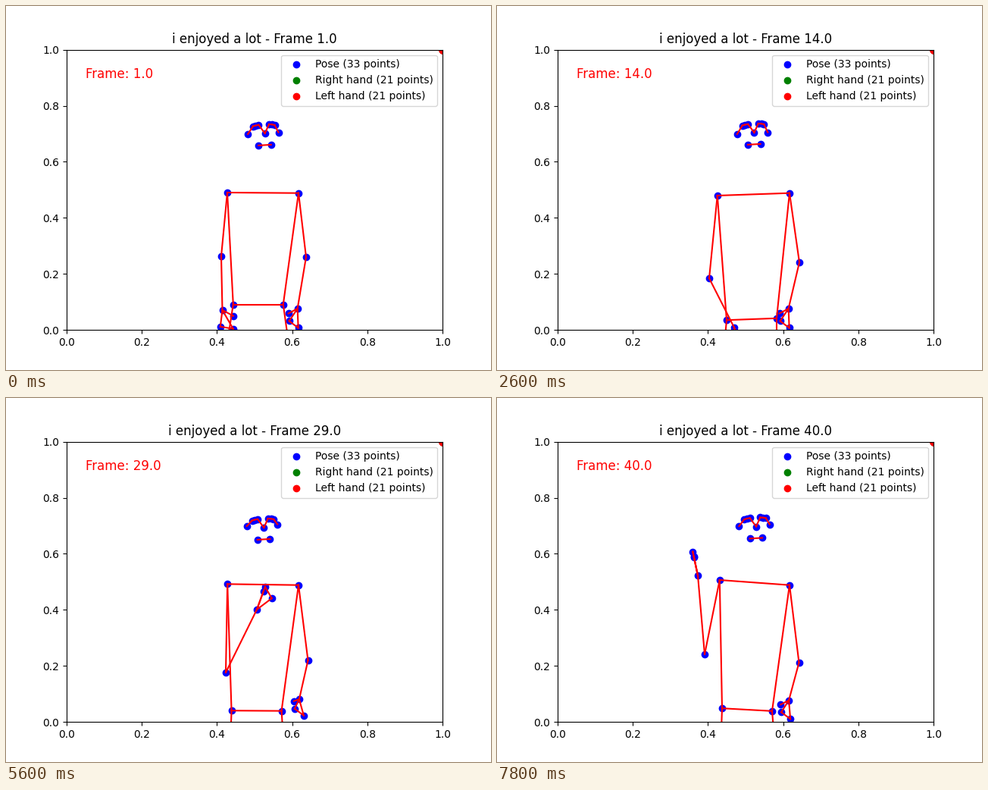
Animation of 640x480 px, one loop 8000 ms. Source, as a matplotlib script:

```python
import numpy as np
import matplotlib.pyplot as plt
from matplotlib.animation import FuncAnimation
from matplotlib.collections import LineCollection

FRAMES, INTERVAL = 40, 200

# Landmark numbers joined by bones.
CHAINS = [
    (7, 3, 2, 1, 0, 4, 5, 6, 8), (9, 10),
    (26, 24, 12, 11, 23, 25), (24, 23),
    (11, 13, 15, 17, 19, 15, 21),
    (12, 14, 16, 18, 20, 16, 22),
]
BONES = [pair for chain in CHAINS for pair in zip(chain, chain[1:])]


def track(count, *keys):
    """Ease between (count, value...) keys; several values give a point."""
    for (a, *start), (b, *end) in zip(keys, keys[1:]):
        if count <= b:
            break
    t = (count - a) / (b - a)
    t = t * t * (3 - 2 * t)
    value = np.array(start) + (np.array(end) - np.array(start)) * t
    return value if len(value) > 1 else value[0]


def polar(degrees, length):
    a = np.radians(degrees)
    return length * np.array([np.cos(a), np.sin(a)])


def head(count):
    """A mirrored, slightly rolled face that sways, with the ears as pivot."""
    cx = 340.2 + track(count, (1, 0), (10, -2.3), (23, -2), (40, 0.3))
    nod = track(count, (1, 0), (14, -1), (23, 3), (33, 3), (40, 1.5))
    points = {0: (cx + 1.5, 168 + nod)}

    def pair(left, right, dx, y, shift=0):
        for n, side in (left, 1), (right, -1):
            points[n] = (cx + shift + side * dx, y - 0.06 * side * dx)

    for i, (dx, y) in enumerate([(6.8, 156.4), (10.8, 156.9), (14.3, 157.8)]):
        pair(1 + i, 4 + i, dx, y + nod)
    pair(7, 8, 20.2, 167.8, -0.9)
    pair(9, 10, 8.3, 183.4 + nod, 1.3)
    return points


def torso(count):
    """The right shoulder shrugs and tilts the hips along with it."""
    shrug = track(count, (1, 0), (7, 4), (14, 4), (23, 0), (33, -1), (40, -6))
    hip = track(count, (1, 332.8, 393.5), (7, 335.5, 413), (14, 336, 413),
                (23, 330.8, 413), (40, 330, 411))
    slope = np.array([33, -0.3 * shrug])
    spread = 37 + 0.6 * (413 - hip[1])
    return {
        11: (386, 246.7), 12: (292 - 0.3 * shrug, 246 + shrug),
        23: hip + slope, 24: hip - slope,
        25: (332 + spread, 500), 26: (332 - spread, 500),
    }


def left_arm(count):
    """A hanging arm whose hand curls inwards and down."""
    curl = track(count, (1, 3), (7, 11), (14, 3), (23, -2), (33, -2), (40, 2))
    elbow = track(count, (1, 396, 331), (7, 398, 342), (14, 399, 338),
                  (29, 398.5, 346), (40, 398.5, 349))
    wrist = np.array([386 - 0.45 * curl, 398 + 0.35 * curl])
    hand = wrist + curl * np.array([-1, 0.8])
    return {13: elbow, 15: wrist,
            17: hand + (4, 23), 19: hand + (-8, 14), 21: hand + (-9, 4)}


def right_arm(count):
    """The arm sinks, lifts to the chest, then swings out and up."""
    elbow = track(count, (1, 284, 330), (7, 282, 348), (14, 280, 359),
                  (23, 287, 361), (29, 290, 362), (33, 288, 362), (40, 274, 338))
    wrist = track(count, (1, 285.5, 401), (7, 300, 420), (14, 313, 424),
                  (23, 326, 276), (29, 331, 279), (33, 323, 286), (40, 265, 234))
    aim = track(count, (1, 60), (14, 76), (23, -70), (33, -70), (40, -102))
    fan = track(count, (1, 37), (7, 0), (14, 0), (23, 33), (33, 33), (40, 0))
    hang = max(0, np.sin(np.radians(aim)))
    size = 32 - 4 * hang
    return {
        14: elbow, 16: wrist,
        18: wrist + polar(aim + fan, size * 0.77),
        20: wrist + polar(aim, size),
        22: wrist + polar(aim - fan * hang, size * (0.8 - 0.007 * fan * hang)),
    }


def pose(count):
    """All landmarks in axes units, worked out in stage pixels."""
    points = {}
    for part in head, torso, left_arm, right_arm:
        points.update(part(count))
    return {n: ((x - 80) / 496, (427.2 - y) / 369.6)
            for n, (x, y) in points.items()}


fig, ax = plt.subplots(figsize=(6.4, 4.8), dpi=100)
ax.set_xlim(0, 1)
ax.set_ylim(0, 1)
dots = ax.scatter([], [], c="blue", label="Pose (33 points)")
# Unseen hands rest with all their points in the corner.
for side, color in ("Right", "green"), ("Left", "red"):
    ax.scatter([1] * 21, [1] * 21, c=color, label=f"{side} hand (21 points)")
bones = ax.add_collection(LineCollection([], colors="red", linewidths=1.5,
                                         capstyle="projecting", zorder=2))
counter = ax.text(0.05, 0.9, "", color="red", fontsize=12)
title = ax.set_title("")
ax.legend(loc="upper right")


def draw(frame):
    count = frame + 1
    points = pose(count)
    dots.set_offsets(list(points.values()))
    bones.set_segments([(points[a], points[b]) for a, b in BONES])
    counter.set_text(f"Frame: {count:.1f}")
    title.set_text(f"i enjoyed a lot - Frame {count:.1f}")
    return dots, bones, counter, title


anim = FuncAnimation(fig, draw, frames=FRAMES, interval=INTERVAL,
                     repeat=True, repeat_delay=0, blit=False)
plt.show()
```
